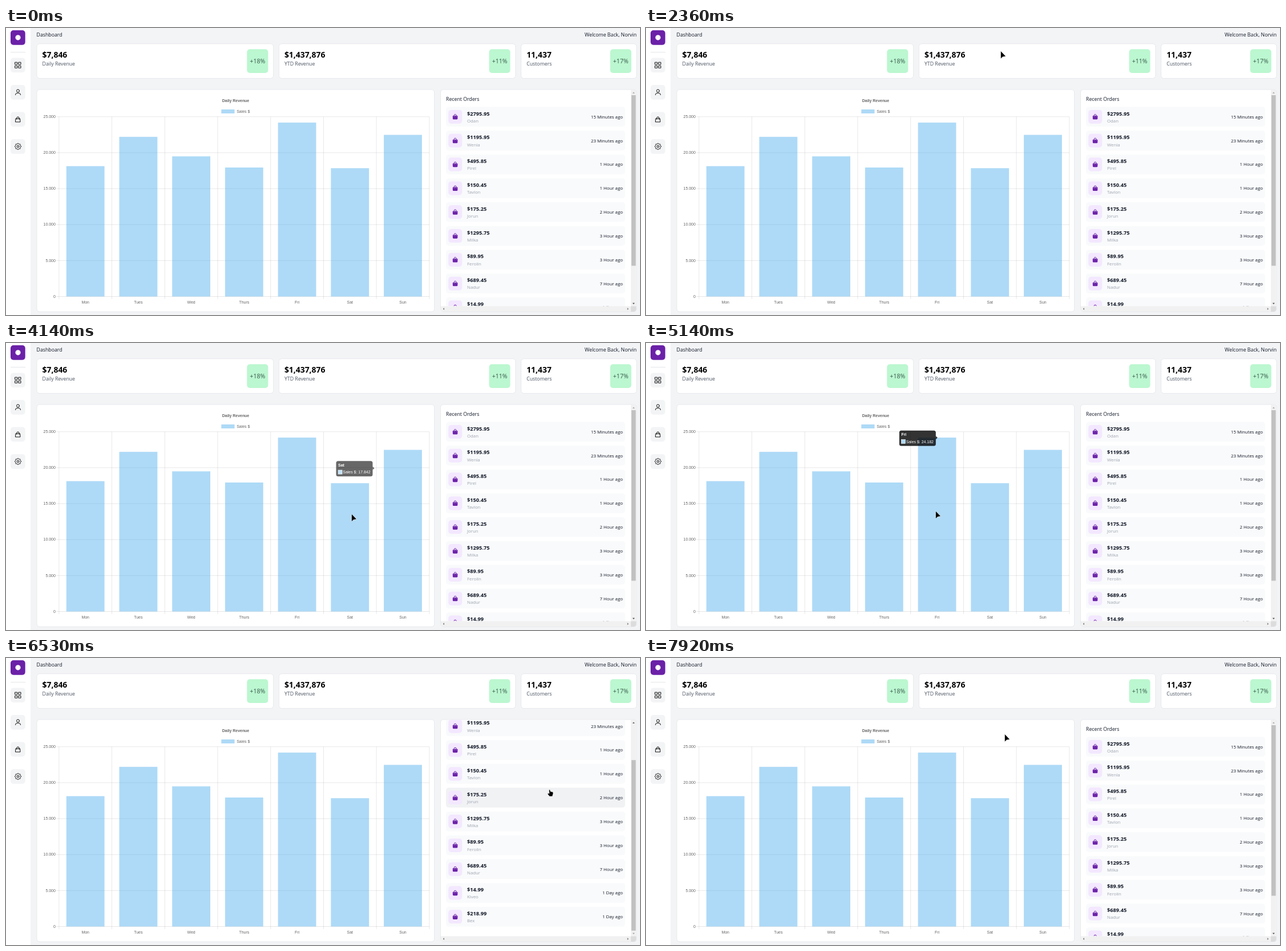
These frames come from a looping animation (1111x504 px, 8 s). An HTML page:

```html
<!DOCTYPE html>
<html lang="en">
<head>
<meta charset="utf-8">
<title>Dashboard</title>
<style>
  html, body { margin: 0; width: 100%; height: 100%; overflow: hidden; background: #f3f4f6; }
  svg { display: block; }
  text { font: 8.75px "Open Sans", "Noto Sans", sans-serif; fill: #111827; white-space: pre; }
  .big { font-size: 13.9px; font-weight: 700; fill: #000; }
  .sub { fill: #4b5563; }
  .gain { font-size: 10.6px; fill: #38574b; text-anchor: middle; }
  .price { font-size: 9.26px; font-weight: 700; }
  .name { font-size: 7.8px; fill: #9ca3af; }
  .ago { font-size: 7.85px; text-anchor: end; }
  .end { text-anchor: end; }
  .chart text { font: 6.95px "Liberation Sans", Arial, sans-serif; fill: #666; }
  .chart .mid { text-anchor: middle; }
  .chart .end { text-anchor: end; }
  .chart .bold { font-weight: 700; }
  .chart #tip text { fill: #fff; }
  .card { fill: #fff; stroke: #e5e7eb; stroke-width: .9; }
  .icon { fill: none; stroke: #111; stroke-width: 1; stroke-linejoin: round; stroke-linecap: round; }
  .grid { stroke: #000; stroke-opacity: .13; stroke-width: .75; fill: none; }
  .row > rect:first-child { fill: #f9fafb; }
  .row.hover > rect:first-child { fill: #f1f2f4; }
</style>
</head>
<body>
<svg id="stage" width="1111" height="504" viewBox="0 0 1111 504">
  <defs><clipPath id="view"><rect x="762" y="108.5" width="333" height="380"/></clipPath></defs>
  <rect width="1111" height="504" fill="#f3f4f6"/>
  <g id="side"></g>
  <text x="53.5" y="14.8">Dashboard</text>
  <text x="1105" y="14.8" class="end">Welcome Back, Norvin</text>
  <g id="cards"></g>
  <g id="orders">
    <rect class="card" x="761.5" y="108" width="343.5" height="390.3" rx="5"/>
    <g clip-path="url(#view)"><g id="list"><text x="771" y="127.8">Recent Orders</text></g></g>
    <path d="M1095 108.5h5a4.5 4.5 0 0 1 4.5 4.5v375.5h-9.5z" fill="#f1f1f1"/>
    <path d="M762 488.5h333v9.4h-329a4 4 0 0 1-4-4z" fill="#f1f1f1"/>
    <path d="M1095 488.5h9.5v5a4.5 4.5 0 0 1-4.5 4.5h-5z" fill="#dcdcdc"/>
    <rect id="thumb" x="1096" y="118" width="7.6" height="299.5" fill="#c1c1c1"/>
    <path id="up" d="M1097.8 114.8l2-2.4 2 2.4z"/>
    <path id="down" d="M1097.8 482.8l2 2.4 2-2.4z"/>
    <path d="M768 491.2l-2.3 2 2.3 2zM1088.8 491.2l2.3 2-2.3 2z" fill="#7d7d7d"/>
  </g>
  <g class="chart">
    <rect class="card" x="54" y="108" width="696.7" height="390.3" rx="5"/>
    <text x="402.5" y="129.7" class="mid bold">Daily Revenue</text>
    <rect x="377.3" y="143" width="23.2" height="7" fill="#aedaf7"/>
    <text x="404.2" y="149">Sales $</text>
    <g id="plot"></g>
    <g id="tip">
      <rect width="64" height="27" rx="3.5" fill-opacity=".8"/>
      <path d="M64 9.7l3 2.9-3 2.9z" fill-opacity=".8"/>
      <text id="tipDay" x="3.6" y="9.6" class="bold"></text>
      <rect x="3.6" y="15.8" width="7" height="7" fill="#aedaf7" stroke="#fff" stroke-width=".6"/>
      <text id="tipVal" x="11.8" y="21.8"></text>
    </g>
  </g>
  <g id="cursor" stroke="#fff" stroke-width=".6" stroke-linejoin="round">
    <path id="arrow" d="M0 0V13.8L3.5 10.4 9 9.4Z"/>
    <path id="hand" d="M-.6 .6Q.7-.5 1.5 1L2.3 3.4 5.5 4.1Q7.2 4.7 7 6.6L5.5 12H.3L-2.8 8Q-3.3 6.4-1.6 6.5L0 7Z"/>
  </g>
</svg>
<script>
const LOOP = 8000;
const $ = id => document.getElementById(id);
const add = (id, markup) => $(id).insertAdjacentHTML('beforeend', markup);
const rect = (x, y, w, h, fill, r = 5) =>
  `<rect x="${x}" y="${y}" width="${w}" height="${h}" rx="${r}" fill="${fill}"/>`;
const text = (x, y, cls, s) => `<text x="${x}" y="${y}" class="${cls}">${s}</text>`;
const clamp = v => Math.max(0, Math.min(1, v));
const mix = (a, b, u) => a + (b - a) * u;
const smooth = (t, a, b) => { const u = clamp((t - a) / (b - a)); return u * u * (3 - 2 * u); };

// Sidebar
const gear = Array.from({ length: 64 }, (_, i) => {
  const a = i / 64 * 2 * Math.PI, r = 4.9 + .65 * Math.tanh(2 * Math.cos(8 * a));
  return `${(21 + r * Math.cos(a)).toFixed(2)},${(208 + r * Math.sin(a)).toFixed(2)}`;
}).join(' ');
add('side', rect(0, 0, 43, 504, '#fff', 0) + rect(8, 4, 25.7, 25.7, '#6b21a8') +
  '<circle cx="21" cy="16.8" r="4.6" fill="#fff"/><path d="M8 42.5h26" stroke="#e5e7eb"/>');
for (let i = 0; i < 4; i++) add('side', rect(8, 52.4 + 47.6 * i, 25.7, 25.7, '#f3f4f6'));
add('side', `<g class="icon">
  <path d="M16 60.2h3.8v3.8h-3.8zM22.2 60.2h3.8v3.8h-3.8zM16 66.4h3.8v3.8h-3.8zM22.2 66.4h3.8v3.8h-3.8z"/>
  <circle cx="21" cy="110.4" r="2.5"/>
  <path d="M16.6 117.6v-.4a2.8 2.8 0 0 1 2.8-2.8h3.2a2.8 2.8 0 0 1 2.8 2.8v.4"/>
  <path d="M17.3 159h7.2l.5 6h-8.2zM18.9 160.6v-2.6a2 2 0 0 1 4 0v2.6"/>
  <polygon points="${gear}"/><circle cx="21" cy="208" r="1.8"/>
</g>`);

// Summary cards on a five-column grid
const GRID = 212.15, GAP = 9.7;
let col = 0;
for (const [span, value, label, gain] of [[2, '$7,846', 'Daily Revenue', '+18%'],
  [2, '$1,437,876', 'YTD Revenue', '+11%'], [1, '11,437', 'Customers', '+17%']]) {
  const x = 54 + GRID * col, w = GRID * span - GAP;
  add('cards', `<rect class="card" x="${x}" y="27.7" width="${w}" height="60.8" rx="5"/>` +
    text(x + 9.6, 52, 'big', value) + text(x + 9.6, 66.3, 'sub', label) +
    rect(x + w - 46.3, 37.2, 37, 41.8, '#bbf7d0') + text(x + w - 27.8, 62, 'gain', gain));
  col += span;
}

// Bar chart
const DAYS = ['Mon', 'Tues', 'Wed', 'Thurs', 'Fri', 'Sat', 'Sun'];
const SALES = [18127, 22201, 19490, 17938, 24182, 17842, 22475];
const LEFT = 92.8, BASE = 471.5, COL = 92.72, HEIGHT = 315.7, HALF = 33.4;
const dots = n => n ? (n / 1000).toFixed(3) : '0';
const midX = i => LEFT + COL * (i + .5);
const topY = i => BASE - SALES[i] / 25000 * HEIGHT;
let lines = '';
for (let i = 0; i <= 7; i++) lines += `M${LEFT + COL * i} ${BASE - HEIGHT}V476`;
for (let i = 0; i <= 5; i++) {
  const y = BASE - HEIGHT * i / 5;
  lines += `M88.2 ${y}H${LEFT + COL * 7}`;
  add('plot', text(86.8, y + 2.2, 'end', dots(i * 5000)));
}
add('plot', `<path class="grid" d="${lines}"/>`);
DAYS.forEach((day, i) => add('plot',
  `<rect x="${midX(i) - HALF}" y="${topY(i)}" width="${2 * HALF}" height="${BASE - topY(i)}" fill="#35a2eb" fill-opacity=".4"/>` +
  text(midX(i), 484, 'mid', day)));

// Orders
const PITCH = 41.83, ROW_TOP = 138.5, ROW_H = 34.8;
[['2795.95', 'Odan', '15 Minutes'], ['1195.95', 'Wenla', '23 Minutes'], ['495.85', 'Pirel', '1 Hour'],
 ['150.45', 'Tavlon', '1 Hour'], ['175.25', 'Jorun', '2 Hour'], ['1295.75', 'Milka', '3 Hour'],
 ['89.95', 'Ferolin', '3 Hour'], ['689.45', 'Nadur', '7 Hour'], ['14.99', 'Kiveo', '1 Day'],
 ['218.99', 'Bex', '1 Day']].forEach(([price, name, ago], i) =>
  add('list', `<g class="row" transform="translate(771 ${ROW_TOP + i * PITCH})">` +
    rect(0, 0, 314, ROW_H, '') + rect(4.2, 5.4, 24, 24, '#f3e8ff') +
    `<g transform="translate(16.1 17.6)">
      <path d="M-3.8-2h7.6q.5 0 .5.6v4.2q0 1.6-1.6 1.6h-5.4q-1.6 0-1.6-1.6v-4.2q0-.6.5-.6z" fill="#6b21a8"/>
      <path d="M-1.9-1.8v-.8a1.9 1.9 0 0 1 3.8 0v.8" fill="none" stroke="#6b21a8"/>
      <path d="M-1.9-.6h.1M1.8-.6h.1" stroke="#f3e8ff" stroke-linecap="round" stroke-width=".8"/>
    </g>` +
    text(37, 15, 'price', '$' + price) + text(37, 27.2, 'name', name) +
    text(310, 20.3, 'ago', ago + ' ago') + '</g>'));
const rows = document.querySelectorAll('.row');

// Cursor key points: time, x, y
const PATH = [[964, 960, 476], [1090, 628, 275], [1470, 134, 90.5], [1600, 68, 74], [1740, 33, 46],
  [1870, 90, 18], [2610, 902, 52], [3195, 694, 187], [3239, 679.5, 223.5], [3880, 670, 262],
  [4052, 636, 290], [4124, 605.5, 300], [4640, 585, 301], [4746, 543, 302], [5135, 507.5, 295],
  [5300, 556, 246], [5500, 662, 212], [5640, 868, 156], [6140, 952, 231], [7537, 952, 231],
  [7916, 628.5, 133.5]];

function cursorAt(t) {
  const next = PATH.findIndex(p => p[0] > t);
  if (next === 0) return null;
  if (next < 0) return PATH[PATH.length - 1].slice(1);
  const a = PATH[next - 1], b = PATH[next], u = (t - a[0]) / (b[0] - a[0]);
  return [mix(a[1], b[1], u), mix(a[2], b[2], u)];
}

const scrollAt = t => smooth(t, 6080, 6520) - smooth(t, 6830, 7150);

function rowAt([x, y], scroll) {
  const pos = (y + scroll - ROW_TOP) / PITCH;
  const onRow = x > 771 && x < 1085 && y > 108 && pos >= 0 && pos % 1 < ROW_H / PITCH;
  return onRow ? Math.floor(pos) : -1;
}

const barAt = ([x, y]) => DAYS.findIndex((_, i) =>
  Math.abs(x - midX(i)) < HALF && y > topY(i) && y < BASE);

// The tooltip glides to each bar the cursor enters and fades when it leaves
const STEP = 4, GLIDE = 400, FADE = 200;
const tips = [];
let bar = 5, start = -GLIDE, alpha = 0, from = [midX(bar), topY(bar)];
const tipPos = t => {
  const u = 1 - (1 - clamp((t - start) / GLIDE)) ** 4;
  return [mix(from[0], midX(bar), u), mix(from[1], topY(bar), u)];
};
for (let t = 0; t < LOOP; t += STEP) {
  const p = cursorAt(t), hit = p ? barAt(p) : -1;
  if (hit >= 0 && hit !== bar) {
    from = tipPos(t);
    bar = hit;
    start = t;
  }
  alpha = clamp(alpha + (hit < 0 ? -STEP : STEP) / FADE);
  tips.push({ bar, alpha, pos: tipPos(t) });
}

const move = (id, x, y) => $(id).setAttribute('transform', `translate(${x} ${y})`);
const show = (id, on) => { $(id).style.opacity = +on; };

// The screen refreshes about eight times a second
const FIRST = 964, REFRESH = 126.4;
const hold = t => t < FIRST ? 0 : FIRST + Math.floor((t - FIRST) / REFRESH) * REFRESH;

function draw(time) {
  const t = hold(time), p = cursorAt(t), s = scrollAt(t), scroll = 78 * s;
  const hover = p ? rowAt(p, scroll) : -1;
  show('cursor', p !== null);
  if (p) move('cursor', ...p);
  show('arrow', hover < 0);
  show('hand', hover >= 0);
  rows.forEach((row, i) => row.classList.toggle('hover', i === hover));

  move('list', 0, -scroll);
  move('thumb', 0, 61.3 * s);
  $('up').setAttribute('fill', s > 0 ? '#505050' : '#a3a3a3');
  $('down').setAttribute('fill', s < 1 ? '#505050' : '#a3a3a3');

  const tip = tips[Math.floor(t / STEP)];
  show('tip', tip.alpha);
  move('tip', tip.pos[0] - 66.2, tip.pos[1] - 12.4);
  $('tipDay').textContent = DAYS[tip.bar];
  $('tipVal').textContent = 'Sales $: ' + dots(SALES[tip.bar]);
}

const begin = performance.now();
function tick() {
  draw((performance.now() - begin) % LOOP);
  requestAnimationFrame(tick);
}
tick();
</script>
</body>
</html>
```
